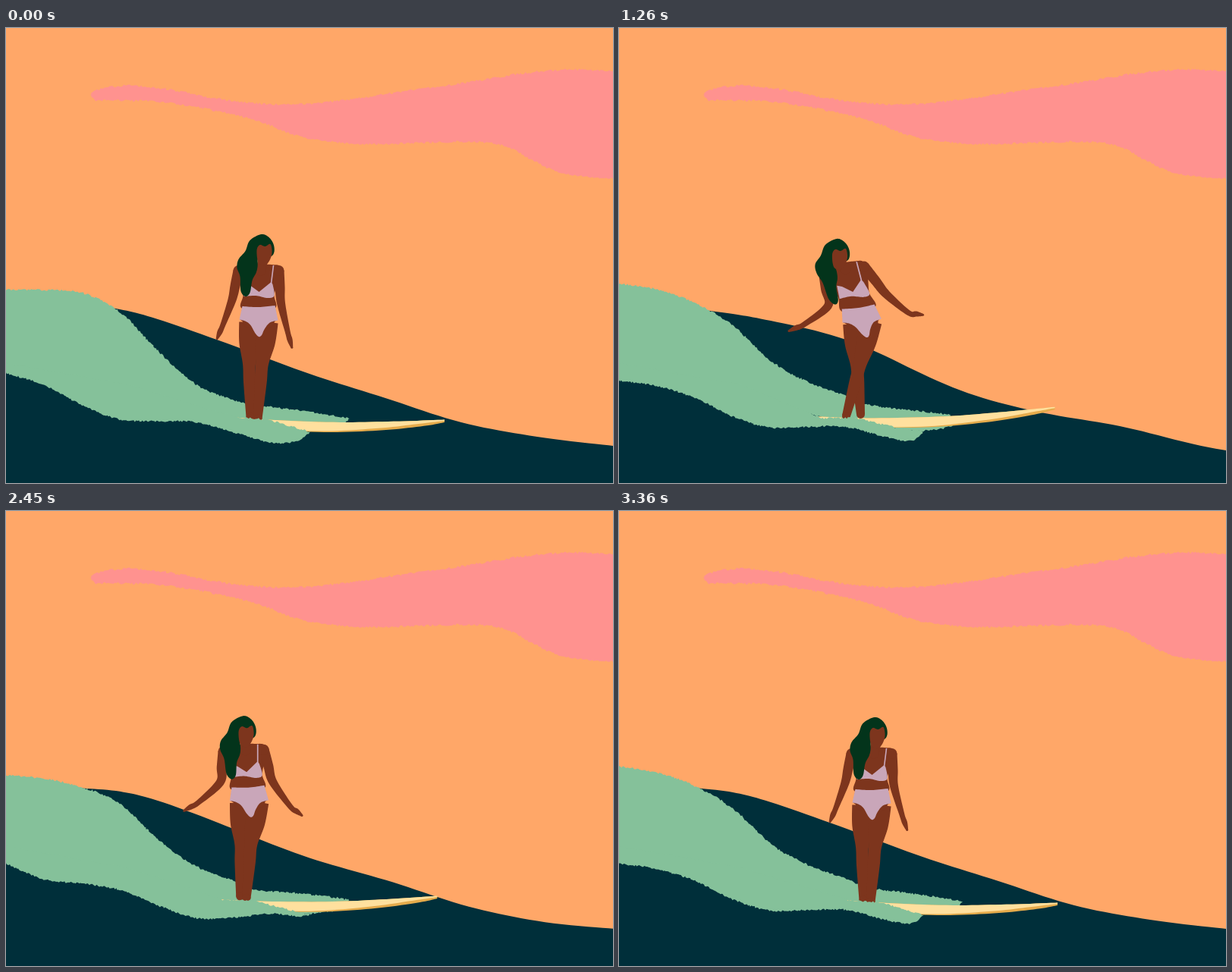
These frames come from a looping animation (800x600 px, 3430 ms). An HTML page with a canvas:

```html
<!DOCTYPE html>
<html lang="en">
<head>
<meta charset="utf-8">
<title>Surfer at sunset</title>
<style>
html, body { margin: 0; width: 100%; height: 100%; overflow: hidden; background: #ffa768; }
canvas { display: block; width: 800px; height: 600px; }
</style>
</head>
<body>
<canvas id="stage" width="800" height="600"></canvas>
<script>
const ctx = document.getElementById('stage').getContext('2d');
const STEP = 70, FRAMES = 49;
const COLOR = {
  sky: '#ffa768', cloud: '#ff928f', sea: '#002f3a', foam: '#85c19a', skin: '#7d351d',
  hair: '#03341b', suit: '#c9a6b9', board: '#ffe09e', rim: '#e5ab4c'
};

// ---------- maths ----------
const { sin, cos, PI, max, min, hypot, floor } = Math;
const mix = (a, b, k) => a.map((v, i) => v + (b[i] - v) * k);
const add = (p, x, y) => [p[0] + x, p[1] + y];
const swing = (p, angle, len) => add(p, sin(angle) * len, cos(angle) * len);
const turn = (phase, period) => 2 * PI * phase / period;
const noise = i => { const s = sin(i * 127.1 + 11.7) * 43758.5453; return (s - floor(s)) * 2 - 1; };
const every50 = (n, fn) => Array.from({ length: n }, (_, i) => [i * 50, fn(i * 50, i)]);

function pairs(...list) {
  const out = [];
  for (let i = 0; i < list.length; i += 2) out.push([list[i], list[i + 1]]);
  return out;
}

// Catmull-Rom through points of any dimension
function spline(pts, closed = false, steps = 10) {
  const n = pts.length, out = [];
  const at = i => closed ? pts[(i + n) % n] : pts[max(0, min(n - 1, i))];
  for (let i = 0; i < (closed ? n : n - 1); i++) {
    const p = at(i - 1), a = at(i), b = at(i + 1), q = at(i + 2);
    for (let s = 0; s < steps; s++) {
      const t = s / steps;
      out.push(a.map((v, d) => {
        const c1 = b[d] - p[d];
        const c2 = 2 * p[d] - 5 * v + 4 * b[d] - q[d];
        const c3 = 3 * (v - b[d]) + q[d] - p[d];
        return v + 0.5 * t * (c1 + t * (c2 + t * c3));
      }));
    }
  }
  if (!closed) out.push(pts[n - 1]);
  return out;
}

// Monotone easing through the poses
const BEATS = [0, 7, 18, 24, 31, 40, 48];
function track(...vals) {
  const slope = j => (vals[j + 1] - vals[j]) / (BEATS[j + 1] - BEATS[j]);
  const tangent = j => {
    if (j < 1 || j > BEATS.length - 2) return 0;
    const a = slope(j - 1), b = slope(j);
    return a * b <= 0 ? 0 : 2 * a * b / (a + b);
  };
  return f => {
    let i = 0;
    while (i < BEATS.length - 2 && f >= BEATS[i + 1]) i++;
    const h = BEATS[i + 1] - BEATS[i], t = (f - BEATS[i]) / h, u = 1 - t;
    return vals[i] * (1 + 2 * t) * u * u + vals[i + 1] * t * t * (3 - 2 * t) +
      h * t * u * (tangent(i) * u - tangent(i + 1) * t);
  };
}

// ---------- drawing ----------
function fill(color, pts) {
  ctx.fillStyle = color;
  ctx.beginPath();
  pts.forEach(p => ctx.lineTo(p[0], p[1]));
  ctx.closePath();
  ctx.fill();
}

// Grainy outline: resample densely and shake
function rough(pts, amount, seed) {
  const out = [];
  pts.forEach((p, i) => {
    const q = pts[(i + 1) % pts.length];
    const n = max(1, Math.round(hypot(q[0] - p[0], q[1] - p[1]) / 2));
    for (let s = 0; s < n; s++) {
      const k = (seed + out.length) * 2;
      out.push(add(mix(p, q, s / n), noise(k) * amount * 0.5, noise(k + 1) * amount));
    }
  });
  return out;
}

// Tapered limb through [x, y, width]
function limb(color, pts) {
  const c = spline(pts), left = [], right = [], end = c.length - 1;
  c.forEach((p, i) => {
    const a = c[max(0, i - 1)], b = c[min(end, i + 1)];
    const dx = b[0] - a[0], dy = b[1] - a[1], k = p[2] / 2 / (hypot(dx, dy) || 1);
    left.push(add(p, -dy * k, dx * k));
    right.unshift(add(p, dy * k, -dx * k));
  });
  fill(color, left.concat(right));
  for (const p of [c[0], c[end]]) {
    ctx.beginPath();
    ctx.arc(p[0], p[1], min(p[2] / 2, 8), 0, 7);
    ctx.fill();
  }
}

// ---------- motion ----------
const waistX = track(333, 309, 315, 309, 313, 327, 333);
const waistY = track(366, 360, 367, 351, 361, 364, 366);
const leanBy = track(0, 0.28, 0.38, 0.33, 0.24, 0, 0);
const foreLeft = track(0.37, 0.78, 1, 1.11, 1.18, 0.47, 0.37);
const upRight = track(0.07, 0.3, 0.68, 0.58, 0.44, 0.11, 0.07);
const foreRight = track(0.24, 0.25, 1.06, 1.01, 0.87, 0.5, 0.29);
const stride = track(-10, -8, 19, 20, -5, -10, -10);
const coverBy = track(0.44, 0.36, 0.34, 0.16, 0.39, 0.43, 0.44);

const cloud = rough([
  ...spline(pairs(110,88, 125,80, 165,76, 220,82, 290,95, 360,101, 430,97, 520,84, 600,73, 680,60, 740,55, 806,57)),
  ...spline(pairs(806,198, 760,196, 720,187, 690,172, 655,155, 615,150, 560,151, 480,153, 430,150, 380,141, 340,125, 290,112, 230,101, 180,96, 118,95))
], 1.5, 5);

const ridge = spline(pairs(100,365, 150,371, 200,384, 300,419, 400,456, 500,488, 600,520, 700,539, 800,551));
const crestUp = [348, 348, 351, 374, 425, 470, 491];
const crestOut = [338, 346, 364, 393, 439, 467, 485];

// Ripple running left along the hill, swelling and fading
function hill(f) {
  const p = f % 12, size = 7 * sin(PI * p / 12), centre = 600 - 20.5 * p;
  return ridge.map(([x, y]) => [x, y + size * (cos(turn(x - centre, 340)) - 0.1)]);
}

function crest(f) {
  const a = turn(f + 0.5, 7.5), ys = mix(crestUp, crestOut, 0.5 - 0.5 * cos(a));
  return every50(7, (x, i) => ys[i] - 6 * sin(a) * max(0, min(1, (165 - x) / 60)));
}

function wash(f) {
  const a = turn(f, 12), dip = 5 * cos(a - turn(2.5, 12));
  return [[330, 497 - 5 * sin(a)], [380, 503.5], [430, 510 + dip * 0.6], [445 + 8 * cos(a), 514 + dip]];
}

function swell(f) {
  const wave = x => cos(turn(f - 6.5 + 0.0457 * x, 10));
  const low = every50(8, x => 460 + 0.39 * x - 0.00047 * x * x + 8.5 * wave(x));
  return [...low, [385, 539 + 6 * wave(385)], [402, 532]];
}

// ---------- figures ----------
const hairPts = pairs(337,272, 347,276, 353,285, 354,295, 350,301, 341,300, 333,303, 332,315, 330,323, 325,333,
  322,349, 316,354, 310,347, 309,328, 305,316, 307,305, 316,294, 322,280);
const facePts = pairs(331,293, 335,286, 342,288, 349,285, 351,297, 347,308, 341,313, 333,309);
const torsoPts = pairs(304,319, 318,315, 333,312, 350,312, 362,315, 359,335, 354,352, 354,370, 312,370, 313,352, 309,335);

// Board space: u runs tail to nose, v runs down
function boardSpace(waist, lean) {
  const nose = add(waist, 245 + 38 * lean, 151 - 47 * lean);
  const rise = -8 + 20 * min(1, lean / 0.25), len = hypot(319, rise);
  return (u, v) => add(nose, 319 * (u - 1) + rise / len * v, rise * (1 - u) + 319 / len * v);
}

function drawBoard(at) {
  const edge = (...list) => spline(pairs(...list).map(q => at(...q)));
  const top = edge(0,0, .226,5, .54,6.5, .79,3.5, 1,-.5);
  fill(COLOR.rim, [...top, ...edge(1,3, .915,8.5, .727,16, .476,20, .163,16.5)]);
  fill(COLOR.board, [...top, ...edge(1,1, .9,5.5, .727,13, .476,18.8, .163,16.5)]);
}

function drawSurfer(f, waist, lean) {
  const chestMid = add(waist, -51 * lean, -48 - 7 * lean);
  const hipMid = add(waist, 14 * lean, 19.5);
  const top = add(chestMid, 3.5 - 32 * lean, -46 + 20 * lean);

  // body spaces, drawn up for the upright pose
  const chest = ([x, y]) => {
    const u = (x - 333.5) / 55, v = (y - 318) / 48;
    return add(mix(chestMid, waist, v), 55 * u, -21 * lean * u);
  };
  const pelvis = ([x, y]) => add(mix(waist, hipMid, (y - 366) / 19), (x - 333) * 0.98, -0.3 * lean * (x - 333));
  const skull = ([x, y]) => add(top, x - 337, y - 272);
  const locks = p => {
    const w = max(0, (p[1] - 300) / 53);
    return add(skull(p), 48 * lean * w, 12 * lean * w);
  };

  const foot = add(waist, -6, 148 - 12 * lean), knee = add(waist, -4 + 12 * lean, 77);
  const leg = side => {
    const hip = pelvis([333 + side * 13, 387]);
    const k = add(knee, side * (8.5 - 17 * lean), 0);
    const ankle = add(foot, -side * stride(f) / 2, side);
    limb(COLOR.skin, [[...hip, 26], [...mix(hip, k, 0.5), 26], [...k, 17], [...mix(k, ankle, 0.35), 16], [...ankle, 11]]);
  };
  const arm = (shoulder, side, upper, upperLen, fore, foreLen, sag) => {
    const s = chest(shoulder), e = swing(s, side * upper, upperLen), h = swing(e, side * fore, foreLen);
    const w = add(mix(e, h, 0.6), 0, sag * sin(fore));
    limb(COLOR.skin, [[...s, 14], [...mix(s, e, 0.5), 13], [...e, 11], [...w, 7], [...mix(w, h, 0.55), 7], [...h, 3]]);
  };

  leg(-1);
  leg(1);
  fill(COLOR.skin, spline(torsoPts.map(chest), true));
  fill(COLOR.skin, pairs(312,364, 354,364, 358,384, 333,402, 308,384).map(pelvis));
  arm([307, 320], -1, 0.22 - 0.9 * lean, 40 + 12 * lean, foreLeft(f), 50 + 11 * foreLeft(f), 5);
  arm([360, 320], 1, upRight(f), 43 + 12 * lean, foreRight(f), 60 - 14 * lean, 9);

  // swimsuit
  const brief = spline(pairs(359,385, 348,388, 341,396, 337,404, 333,406, 328,401, 322,391, 315,386, 307,384).map(pelvis));
  fill(COLOR.suit, [...spline(pairs(311,367, 333,368, 355,366).map(pelvis)), ...brief]);
  fill(COLOR.suit, [
    ...pairs(317,338, 323,340, 334,348, 350,335).map(chest),
    ...spline(pairs(352,338, 354,353, 345,356, 330,353, 314,354).map(chest))
  ]);
  ctx.strokeStyle = COLOR.suit;
  ctx.lineWidth = 1.7;
  ctx.beginPath();
  ctx.moveTo(...chest([353, 313]));
  ctx.lineTo(...chest([350, 337]));
  ctx.stroke();

  const chin = skull([340, 304]), neck = chest([336, 319]);
  limb(COLOR.skin, [[...chin, 13], [...mix(chin, neck, 0.6), 13], [...neck, 15]]);
  fill(COLOR.hair, spline(hairPts.map(locks), true));
  fill(COLOR.skin, spline(facePts.map(skull), true));
}

function draw(f) {
  const waist = [waistX(f), waistY(f)], lean = leanBy(f), cover = coverBy(f);
  const at = boardSpace(waist, lean);

  ctx.fillStyle = COLOR.sky;
  ctx.fillRect(0, 0, 800, 600);
  fill(COLOR.cloud, cloud);
  fill(COLOR.sea, [...hill(f), [800, 600], [0, 600], [0, 400]]);

  // foam behind the board
  const back = spline([...crest(f), ...wash(f)]);
  fill(COLOR.foam, rough([...back, [446, 522], [428, 528], [395, 532], [300, 520], [-10, 450]], 1.3, f * 37));

  drawBoard(at);
  drawSurfer(f, waist, lean);

  // foam washing over the tail
  const u = cover - 0.17;
  const lip = [[-10, 440], [160, 470], at(u - 0.13, 3), at(u, max(0, 26 * u * (1 - u))), at(cover, 15.5 + 9 * cover)];
  fill(COLOR.foam, rough([...lip, ...spline(swell(f)).reverse()], 1.2, f * 37 + 900));
}

let shown = -1;
function tick() {
  const f = floor(performance.now() / STEP) % FRAMES;
  if (f !== shown) draw(shown = f);
  requestAnimationFrame(tick);
}
tick();
</script>
</body>
</html>
```
